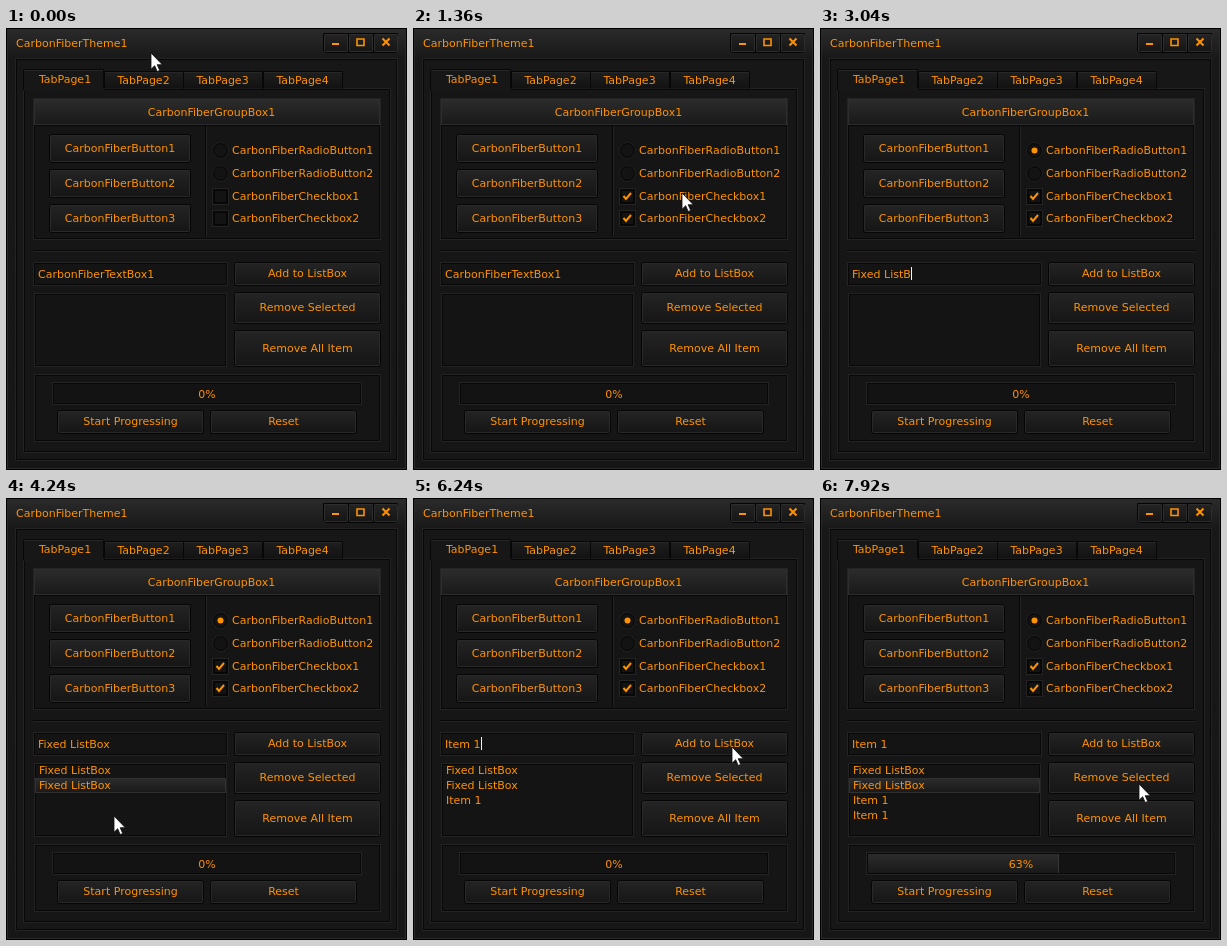
An HTML page for the animation above (8000 ms loop, 401x442 px).

```html
<!DOCTYPE html>
<html lang="en">
<head>
<meta charset="utf-8">
<title>Carbon theme demo</title>
<style>
  html, body { margin: 0; width: 100%; height: 100%; overflow: hidden; background: #161616; }
  svg { display: block; width: 401px; height: 442px; }
  text { font: 11px "DejaVu Sans", Verdana, sans-serif; fill: #ff9200; white-space: pre; }
  .mid { text-anchor: middle; }
</style>
</head>
<body>
<svg id="stage" viewBox="0 0 401 442">
  <defs>
    <linearGradient id="form" x2="0" y2="1">
      <stop stop-color="#2b2b2b"/><stop offset=".07" stop-color="#181818"/><stop offset="1" stop-color="#161616"/>
    </linearGradient>
    <linearGradient id="raised" x2="0" y2="1">
      <stop stop-color="#242424"/><stop offset="1" stop-color="#151515"/>
    </linearGradient>
    <linearGradient id="head" x2="0" y2="1">
      <stop stop-color="#2c2c2c"/><stop offset="1" stop-color="#191919"/>
    </linearGradient>
    <linearGradient id="tab" x2="0" y2="1">
      <stop stop-color="#1f1f1f"/><stop offset="1" stop-color="#121212"/>
    </linearGradient>
  </defs>
</svg>
<script>
const NS = 'http://www.w3.org/2000/svg';
const stage = document.getElementById('stage');
const LOOP = 8000, STEP = 80;

function add(tag, attrs, content) {
  const el = document.createElementNS(NS, tag);
  for (const key in attrs) el.setAttribute(key, attrs[key]);
  if (content) el.textContent = content;
  return stage.appendChild(el);
}
const rect = (x, y, width, height, fill) => add('rect', { x, y, width, height, fill });
const frame = (x, y, w, h, stroke, rx = 0) =>
  add('rect', { x: x + .5, y: y + .5, width: w - 1, height: h - 1, rx, fill: 'none', stroke });
const label = (x, y, text) => add('text', { x, y }, text);
const centered = (x, y, text) => add('text', { x, y, class: 'mid' }, text);

// Dark outline with a faint lighter line beside it
function panel(x, y, w, h, fill) {
  rect(x, y, w, h, fill);
  frame(x, y, w, h, '#232323');
  frame(x + 1, y + 1, w - 2, h - 2, '#080808');
}
function button(x, y, w, h, text, base) {
  add('rect', { x: x + .5, y: y + .5, width: w - 1, height: h - 1, rx: 2, fill: 'url(#raised)', stroke: '#050505' });
  frame(x + 1, y + 1, w - 2, h - 2, '#292929', 1);
  centered(x + w / 2, base, text);
}

// Window
rect(0, 0, 401, 442, 'url(#form)');
frame(0, 0, 401, 442, '#000');
frame(1, 1, 399, 440, '#2a2a2a');
label(10, 19, 'CarbonFiberTheme1');
panel(9, 30, 383, 403, '#171717');

// Window buttons
add('path', { d: 'M317.5 5.5H391.5V22.5L389.5 24.5H319.5L317.5 22.5Z', fill: 'url(#raised)', stroke: '#050505' });
for (let i = 0; i < 3; i++) {
  frame(318 + 25 * i, 6, 24, 18, '#2d2d2d', 1);
  if (i) rect(317 + 25 * i, 6, 1, 18, '#050505');
}
rect(326, 15, 7, 2, '#ff9200');
add('path', { d: 'M351 11H358V17.5H351Z', fill: 'none', stroke: '#ff9200', 'stroke-width': 1.6 });
add('path', { d: 'M376.5 10.5l7 7m0-7l-7 7', stroke: '#ff9200', 'stroke-width': 2 });

// Tabs
panel(17, 60, 368, 365, '#161616');
[98, 177, 257].forEach((x, i) => {
  add('path', { d: `M${x + .5} 60.5V43.5H${x + 79.5}V60.5`, fill: 'url(#tab)', stroke: '#070707' });
  rect(x + 1, 44, 78, 1, '#272727');
  centered(x + 39.5, 56, 'TabPage' + (i + 2));
});
rect(17, 41, 81, 22, '#171717');
add('path', { d: 'M17.5 62V41.5H97.5V60', fill: 'none', stroke: '#080808' });
rect(18, 42, 79, 1, '#272727');
centered(59, 55, 'TabPage1');

// Group box
panel(27, 70, 348, 142, '#151515');
rect(28, 71, 346, 26, 'url(#head)');
frame(28, 71, 346, 26, '#2e2e2e');
rect(28, 97, 346, 1, '#060606');
centered(205.5, 88, 'CarbonFiberGroupBox1');
rect(199, 98, 1, 110, '#060606');
rect(200, 98, 1, 110, '#242424');
for (let i = 0; i < 3; i++)
  button(43, 106 + 35 * i, 142, 29, 'CarbonFiberButton' + (i + 1), 124 + 35 * i);

[122, 145].forEach((y, i) => {
  add('circle', { cx: 214.5, cy: y + .5, r: 8, fill: '#141414', stroke: '#202020' });
  add('circle', { cx: 214.5, cy: y + .5, r: 6.8, fill: '#131313', stroke: '#070707' });
  label(226, y + 4, 'CarbonFiberRadioButton' + (i + 1));
});
const dot = add('circle', { cx: 214.5, cy: 122.5, r: 3, fill: '#ff9200' });
const checks = [160, 182].map((y, i) => {
  panel(206, y, 17, 17, '#131313');
  frame(208, y + 2, 13, 13, '#070707');
  label(226, y + 12, 'CarbonFiberCheckbox' + (i + 1));
  return add('path', { d: `M210.5 ${y + 8}l2.5 3l5-6`, fill: 'none', stroke: '#ff9200', 'stroke-width': 2 });
});

// List area
rect(27, 222, 348, 1, '#060606');
rect(27, 223, 348, 1, '#252525');
panel(27, 234, 195, 24, '#141414');
panel(28, 265, 193, 74, '#141414');
button(228, 234, 147, 24, 'Add to ListBox', 249);
button(228, 264, 147, 32, 'Remove Selected', 283);
button(228, 302, 147, 37, 'Remove All Item', 324);
const field = label(32, 250, '');
const caret = rect(0, 239, 1, 13, '#f4f4f4');
const marker = add('g', {});
marker.append(rect(29, 0, 191, 15, 'url(#head)'), frame(29, 0, 191, 15, '#303030'));
const fixed = 'Fixed ListBox', item = 'Item 1';
const items = [fixed, fixed, item, item];
const rows = items.map((_, i) => label(33, 276 + 15 * i, ''));

// Progress
panel(28, 346, 347, 68, '#151515');
panel(46, 354, 310, 23, '#131313');
const bar = rect(48, 356, 0, 19, 'url(#head)');
const barEdge = rect(0, 356, 1, 19, '#343434');
const percent = centered(201, 370, '0%');
button(51, 382, 147, 24, 'Start Progressing', 397);
button(204, 382, 147, 24, 'Reset', 397);

const pointer = add('path', {
  d: 'M0 0V16.2L3.7 12.7L6.2 18.5L8.7 17.4L6.2 11.7H11.3Z',
  fill: '#fff', stroke: '#111', 'stroke-width': .8
});

// Pointer paths: [ms, x, y]; a path ends when the pointer hides
const toChecks = [[0, 145, 25], [160, 122, 55], [640, 214, 189], [880, 229, 180],
  [1200, 215, 167], [1360, 269, 165], [1760, 282, 120], [2080, 160, 236], [2320, 8, 236]];
const toList = [[3360, 150, 232], [3440, 280, 224], [3600, 342, 244], [3840, 340, 244],
  [4160, 108, 291], [4240, 108, 318], [4400, 111, 327], [4960, 150, 243], [5120, 150, 236], [5360, 1, 235]];
const toProgress = [[6000, 150, 250], [6160, 312, 250], [6240, 319, 249], [6400, 320, 249],
  [6560, 190, 298], [6720, 175, 303], [6960, 126, 396], [7120, 125, 400], [7200, 198, 328],
  [7360, 195, 288], [7680, 255, 236], [7920, 319, 286], [8000, 319, 286]];
const paths = [toChecks, toList, toProgress];

// State changes: [ms, value]
const focus = [[0, false], [2320, true], [4160, false], [5120, true], [6640, false]];
const added = [3600, 3760, 6240, 6400];
const chosen = [[0, -1], [4160, 1], [4560, -1], [6640, 2], [7440, 1]];

const at = (list, t) => list.findLast(entry => entry[0] <= t)[1];
const show = (el, on) => el.setAttribute('visibility', on ? 'visible' : 'hidden');

function pointerAt(t) {
  const path = paths.find(p => t >= p[0][0] && t < p[p.length - 1][0]);
  if (!path) return null;
  const i = path.findIndex(p => p[0] > t);
  const [t0, x0, y0] = path[i - 1], [t1, x1, y1] = path[i];
  const k = (t - t0) / (t1 - t0);
  return [Math.round(x0 + (x1 - x0) * k), Math.round(y0 + (y1 - y0) * k)];
}

function typedAt(t) {
  if (t < 2320) return 'CarbonFiberTextBox1';
  if (t < 5520) return fixed.slice(0, 1 + Math.max(0, Math.round((t - 2400) / 80 * 1.2)));
  if (t < 5760) return fixed.slice(0, t < 5600 ? 7 : 1);
  return item.slice(0, 1 + Math.floor((t - 5760) / 48));
}

function draw(t) {
  const pos = pointerAt(t);
  show(pointer, pos);
  if (pos) pointer.setAttribute('transform', `translate(${pos})`);

  show(checks[1], t >= 720);
  show(checks[0], t >= 1200);
  show(dot, t >= 1680);

  field.textContent = typedAt(t);
  show(caret, at(focus, t));
  caret.setAttribute('x', Math.round(32 + field.getComputedTextLength()));

  const pick = at(chosen, t);
  rows.forEach((row, i) => row.textContent = t >= added[i] ? items[i] : '');
  show(marker, pick >= 0);
  marker.setAttribute('transform', `translate(0 ${265 + 15 * pick})`);

  const value = t < 7040 ? 0 : t < 7200 ? 3 : Math.floor(9 + (t - 7200) * .075);
  const width = Math.max(0, Math.round(value * 3.15 - 7.3));
  percent.textContent = value + '%';
  bar.setAttribute('width', width);
  barEdge.setAttribute('x', 47 + width);
  show(barEdge, width > 0);
}

const start = performance.now();
function tick(now) {
  const t = Math.max(0, now - start) % LOOP;
  draw(Math.floor(t / STEP) * STEP);
  requestAnimationFrame(tick);
}
draw(0);
requestAnimationFrame(tick);
</script>
</body>
</html>
```
